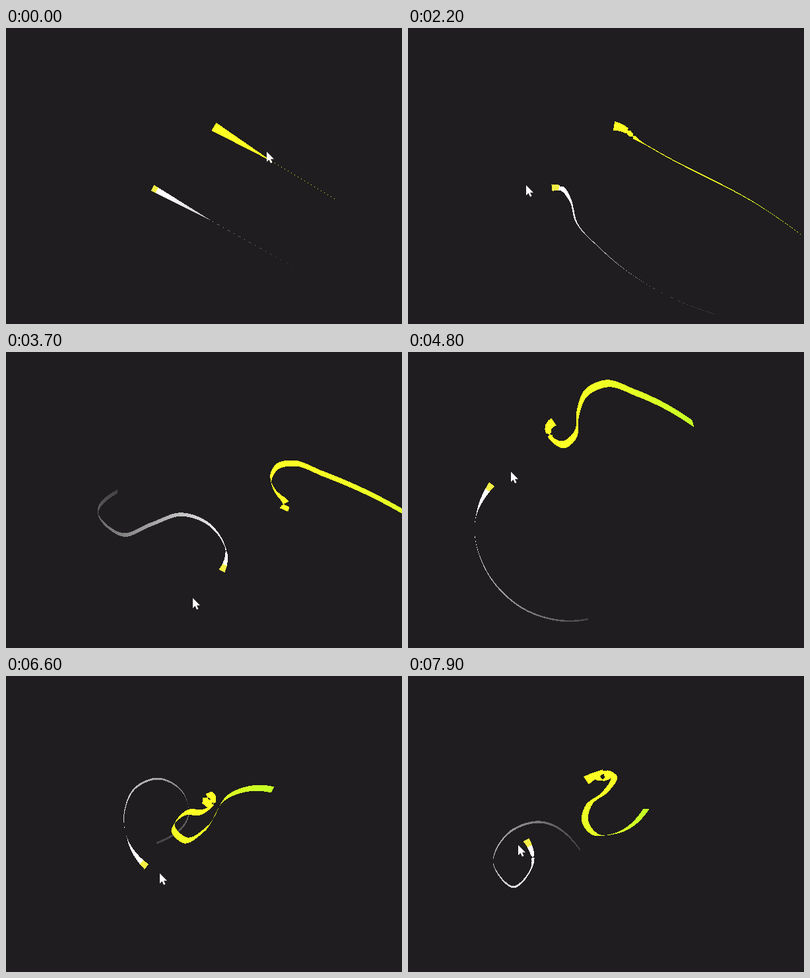
An HTML page with a canvas that plays this animation: 600x450 px, repeating every 8000 ms.

```html
<!DOCTYPE html>
<html lang="en">
<head>
<meta charset="utf-8">
<title>Ribbons</title>
<style>
html, body { margin: 0; width: 100%; height: 100%; overflow: hidden; background: #1f1d1f; }
canvas { display: block; }
</style>
</head>
<body>
<canvas id="stage" width="600" height="450"></canvas>
<script>
const ctx = document.getElementById('stage').getContext('2d');
const LOOP = 8000, STEP = 100, SEGMENTS = 64;
const START = 1800, SET_OFF = 400;
const clamp = (v, a, b) => Math.max(a, Math.min(b, v));
const mix = (a, b, u) => a + (b - a) * u;
const mixPoint = (p, q, u) => [mix(p[0], q[0], u), mix(p[1], q[1], u)];
const map2 = fn => [fn(0), fn(1)];

// A trail is a smooth curve from head (age 0) to tail (age 1), drawn with a
// flat nib: it is thin wherever it runs along the nib.
function trail(nib, ...xy) {
  const pts = [], knots = [0];
  for (let i = 0; i < xy.length; i += 2) pts.push([xy[i], xy[i + 1]]);
  for (let i = 1; i < pts.length; i++) {
    knots.push(knots[i - 1] + Math.hypot(pts[i][0] - pts[i - 1][0], pts[i][1] - pts[i - 1][1]));
  }
  const last = pts.length - 1;
  const slope = (i, k) => (pts[i + 1][k] - pts[i][k]) / (knots[i + 1] - knots[i]);
  const inner = i => map2(k => mix(slope(i - 1, k), slope(i, k),
    (knots[i] - knots[i - 1]) / (knots[i + 1] - knots[i - 1])));
  const tangents = pts.map((p, i) => {
    if (i > 0 && i < last) return inner(i);
    if (last === 1) return map2(k => slope(0, k));
    const near = i ? last - 1 : 1, side = i ? last - 1 : 0;
    return map2(k => 2 * slope(side, k) - inner(near)[k]);
  });

  function at(age) {
    const s = clamp(age, 0, 1) * knots[last];
    let i = 0;
    while (i < last - 1 && s > knots[i + 1]) i++;
    const h = knots[i + 1] - knots[i], f = (s - knots[i]) / h, g = 1 - f;
    return map2(k =>
      g * g * ((1 + 2 * f) * pts[i][k] + f * h * tangents[i][k]) +
      f * f * ((1 + 2 * g) * pts[i + 1][k] - g * h * tangents[i + 1][k]));
  }
  return { nib, at, head: pts[0], tail: pts[last] };
}

// reach: how far the flared head tapers, in pixels
const poses = [
  { time: 0, reach: 105,
    yellow: trail([5, 3.3], 315,150, 500,261),
    white: trail([2.8, 1.4], 222,243, 437,364) },
  { time: 2200, reach: 58,
    yellow: trail([5, 4.2], 312,149, 324,152, 345,168, 375,186, 540,275, 594,313),
    white: trail([2.8, 1.4], 218,243, 233,244, 245,260, 255,295, 290,334, 465,435) },
  { time: 3700, reach: 40,
    yellow: trail([2, 9], 421,240, 424,232, 408,212, 401,193, 411,174, 433,169, 480,185, 690,302),
    white: trail([1, 5.5], 327,333, 334,310, 310,264, 267,247, 220,262, 177,278, 139,243, 169,212) },
  { time: 4800, reach: 55,
    yellow: trail([3, 11], 221,106, 213,114, 217,131, 235,141, 254,125, 257,95, 270,62, 300,48, 345,62, 432,109),
    white: trail([0, 2.5], 127,201, 101,262, 120,335, 178,392, 245,409, 273,406) },
  { time: 5700, reach: 70,
    yellow: trail([5, -3], 308,182, 293,160, 275,154, 258,171, 275,190, 296,184, 307,160, 325,120, 362,102, 446,131),
    white: trail([.5, 1.1], 214,273, 186,240, 155,178, 115,113, 50,85, -2,101) },
  { time: 6600, reach: 55,
    yellow: trail([-5, 9], 312,195, 302,190, 309,180, 316,188, 300,206, 272,208, 253,232, 272,250, 303,232, 335,184, 370,171, 404,173),
    white: trail([.6, 3], 213,290, 188,258, 179,210, 195,171, 231,156, 268,177, 277,205, 228,254) },
  { time: 7900, reach: 55,
    yellow: trail([10, -1], 270,159, 284,151, 300,146, 303,154, 295,160, 286,153, 297,144, 312,153, 300,175, 274,196, 268,220, 284,241, 312,240, 361,202),
    white: trail([.2, 3.3], 179,249, 189,285, 160,321, 129,284, 152,239, 196,222, 261,265) }
];

// time, x, y
const pointer = [
  [0, 395, 188], [450, 410, 119], [1000, 396, 180], [2200, 179, 239], [2550, 123, 222],
  [3700, 283, 374], [4800, 156, 182], [5700, 234, 282], [6600, 233, 300],
  [7200, 200, 358], [7900, 167, 257]
];

// Before the ribbons set off, the tails stretch and the heads stay put.
function resting(from, to, age, t, u) {
  const stretch = t < 1000 ? .33 * Math.sin(Math.PI * t / 1000) : 0;
  const p = from.at(age);
  return mixPoint(map2(k => p[k] + (p[k] - from.head[k]) * stretch), to.at(age), u);
}

// Points stay where the head left them, apart from a steady drift.
function travelling(from, to, age, u) {
  const born = u - age;
  const p = born < 0 ? from.at(-born) : to.at(1 - born);
  const share = born < 0 ? u : u - 1;
  return map2(k => p[k] + (to.tail[k] - from.head[k]) * share);
}

// Hard-edged fill, so hairlines break into dots.
function fillQuad(q, color) {
  ctx.fillStyle = color;
  const ys = q.map(p => p[1]);
  const top = Math.max(0, Math.ceil(Math.min(...ys) - .5));
  const end = Math.min(450, Math.ceil(Math.max(...ys) - .5));
  for (let y = top; y < end; y++) {
    let lo = Infinity, hi = -Infinity;
    const mid = y + .5;
    q.forEach((a, i) => {
      const b = q[(i + 1) % 4];
      if ((a[1] <= mid) === (b[1] <= mid)) return;
      const x = mix(a[0], b[0], (mid - a[1]) / (b[1] - a[1]));
      lo = Math.min(lo, x);
      hi = Math.max(hi, x);
    });
    const left = Math.ceil(lo - .5), right = Math.ceil(hi - .5);
    if (right > left) ctx.fillRect(left, y, right - left, 1);
  }
}

const yellowTone = age => `rgb(${Math.round(255 - 60 * age * age)},255,36)`;
function whiteTone(age, dist) {
  if (dist < 6) return '#f4ee45';
  const v = Math.round(255 - 190 * clamp((age - .1) / .9, 0, 1));
  return `rgb(${v},${v},${v})`;
}

function drawRibbon(pts, nib, flare, reach, tone) {
  let dist = 0;
  const rows = pts.map((p, i) => {
    const a = pts[Math.max(0, i - 1)], b = pts[Math.min(SEGMENTS, i + 1)];
    const dx = b[0] - a[0], dy = b[1] - a[1], len = Math.hypot(dx, dy) || 1;
    if (i) dist += Math.hypot(p[0] - a[0], p[1] - a[1]);
    const normal = [-dy / len, dx / len];
    const across = normal[0] * nib[0] + normal[1] * nib[1];
    const width = flare * Math.max(0, 1 - dist / reach);
    const side = across < 0 ? -width : width;
    const edge = width > Math.abs(across) ? normal.map(n => n * side) : nib;
    return {
      dist,
      left: map2(k => p[k] + edge[k] / 2),
      right: map2(k => p[k] - edge[k] / 2)
    };
  });
  for (let i = SEGMENTS - 1; i >= 0; i--) {
    const a = rows[i], b = rows[i + 1];
    fillQuad([a.left, a.right, b.right, b.left], tone(i / SEGMENTS, a.dist));
  }
}

function drawPointer(t) {
  const i = Math.max(1, pointer.findIndex(p => p[0] >= t));
  const a = pointer[i - 1], b = pointer[i];
  const u = (t - a[0]) / (b[0] - a[0]);
  ctx.save();
  ctx.translate(Math.round(mix(a[1], b[1], u)), Math.round(mix(a[2], b[2], u)));
  ctx.fillStyle = '#fff';
  ctx.fill(new Path2D('M0 0V15.5L3.5 12L6 17.5L8.5 16.5L6 11.2H11Z'));
  ctx.restore();
}

function draw(t) {
  ctx.fillStyle = '#1f1d1f';
  ctx.fillRect(0, 0, 600, 450);
  const i = Math.max(1, poses.findIndex(p => p.time >= t));
  const a = poses[i - 1], b = poses[i];
  const idle = i === 1;
  const u = idle ? clamp((t - START) / SET_OFF, 0, 1) : (t - a.time) / (b.time - a.time);
  const ribbon = (name, flare, tone) => {
    const from = a[name], to = b[name];
    const pts = Array.from({ length: SEGMENTS + 1 }, (_, n) => idle
      ? resting(from, to, n / SEGMENTS, t, u)
      : travelling(from, to, n / SEGMENTS, u));
    drawRibbon(pts, mixPoint(from.nib, to.nib, u), flare, mix(a.reach, b.reach, u), tone);
  };
  ribbon('white', 10, whiteTone);
  ribbon('yellow', 14, yellowTone);
  drawPointer(t);
}

const start = performance.now();
function frame(now) {
  const t = Math.max(0, now - start) % LOOP;
  draw(Math.floor(t / STEP) * STEP);
  requestAnimationFrame(frame);
}
draw(0);
requestAnimationFrame(frame);
</script>
</body>
</html>
```
